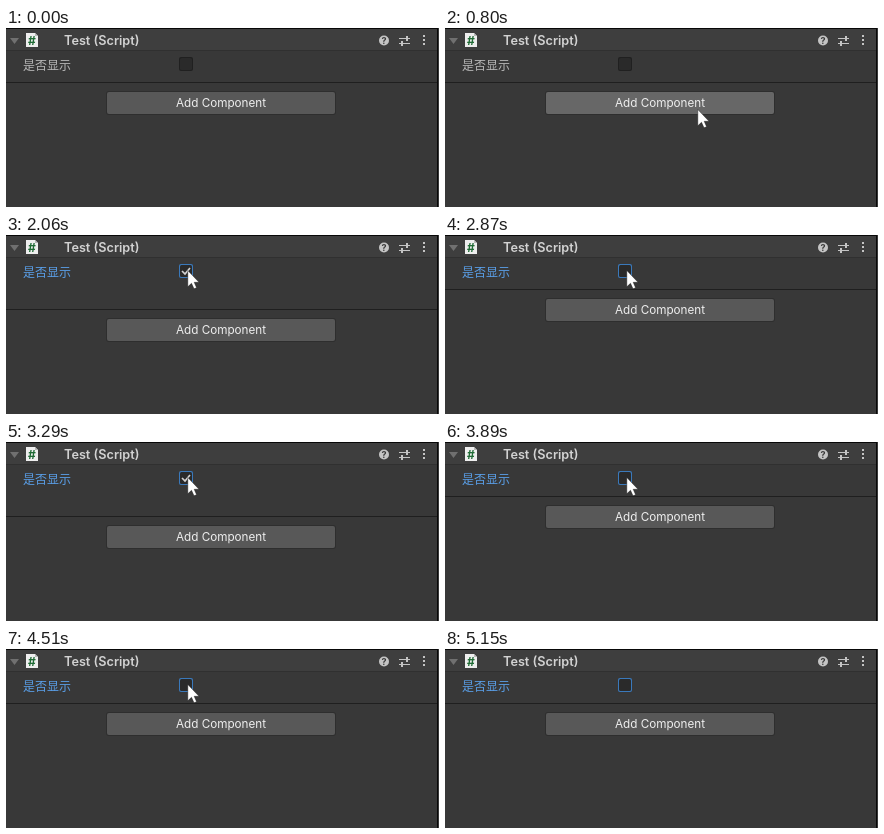
Recreate the animation shown at these times as an HTML page with a canvas. Size 433x179 px, loop 5.52 s.

```html
<!DOCTYPE html>
<html lang="zh-CN">
<head>
<meta charset="utf-8">
<title>Inspector toggle</title>
<style>
html, body { margin: 0; width: 100%; height: 100%; overflow: hidden; background: #383838; }
canvas { display: block; }
</style>
</head>
<body>
<canvas id="stage" width="433" height="179"></canvas>
<script>
const ctx = document.getElementById('stage').getContext('2d');
const LOOP = 5520;
const ROW = 20;
const PRESSES = [[1580, 1710], [2640, 2870], [3190, 3290], [3740, 3890], [4060, 4180], [4350, 4510]];

const lerp = (a, b, u) => a + (b - a) * u;
const easeOut = (u, power) => 1 - Math.pow(1 - u, power);
const smooth = u => u * u * (3 - 2 * u);

function cursorAt(t) {
  if (t < 580 || t >= 5150) return null;
  if (t < 1130) {
    const u = (t - 580) / 550;
    return [lerp(362, 171, easeOut(u, 1.66)), lerp(171, 29, easeOut(u, 1.95))];
  }
  if (t < 1260) return [171, 29];
  if (t < 1420) {
    const u = smooth((t - 1260) / 160);
    return [lerp(171, 180, u), lerp(29, 33, u)];
  }
  if (t < 1580) return [180, 33];
  if (t < 2030) return [181, 33];
  if (t < 2060) return [181, 34];
  if (t < 4740) return [181, 35];
  const u = Math.pow((t - 4740) / 410, 1.5);
  return [lerp(181, 353, u), lerp(35, 178, u)];
}

function rect(x, y, w, h, color) {
  ctx.fillStyle = color;
  ctx.fillRect(x, y, w, h);
}

function roundRect(x, y, w, h, r, color) {
  ctx.fillStyle = color;
  ctx.beginPath();
  ctx.roundRect(x, y, w, h, r);
  ctx.fill();
}

function disc(x, y, r, color) {
  ctx.fillStyle = color;
  ctx.beginPath();
  ctx.arc(x, y, r, 0, Math.PI * 2);
  ctx.fill();
}

function shape(points, color) {
  ctx.fillStyle = color;
  ctx.beginPath();
  points.forEach(([x, y]) => ctx.lineTo(x, y));
  ctx.closePath();
  ctx.fill();
}

function text(str, x, y, font, color, align = 'left') {
  ctx.font = font;
  ctx.fillStyle = color;
  ctx.textAlign = align;
  ctx.fillText(str, x, y);
}

function drawHeader() {
  rect(0, 0, 431, 23, '#3e3e3e');
  rect(0, 0, 431, 1, '#080808');
  rect(0, 22, 431, 1, '#303030');
  shape([[4, 10], [13, 10], [8.5, 16]], '#707070');

  shape([[20, 5], [29, 5], [32, 8], [32, 19], [20, 19]], '#eeeeee');
  shape([[29, 5], [32, 8], [29, 8]], '#b8b8b8');
  text('#', 26, 17, 'bold 12px Inter, sans-serif', '#1f6b35', 'center');
  text('Test (Script)', 58, 17, '600 12.7px Inter, sans-serif', '#d2d2d2');

  disc(378, 12.5, 5, '#c4c4c4');
  text('?', 378, 16, 'bold 9px Inter, sans-serif', '#383838', 'center');

  rect(393, 10, 11, 1, '#c4c4c4');
  rect(400, 8, 2, 5, '#c4c4c4');
  rect(393, 15, 11, 1, '#c4c4c4');
  rect(395, 13, 2, 5, '#c4c4c4');
  for (const y of [8, 12, 16]) rect(417, y - 1, 2, 2, '#c4c4c4');
}

function drawToggle(focused, checked) {
  text('是否显示', 17, 42, '12px "Noto Sans CJK SC", "Noto Sans CJK", sans-serif',
    focused ? '#5a9fe8' : '#b8b8b8');
  roundRect(173, 29, 14, 14, 2, focused ? '#3a79bb' : '#202020');
  roundRect(174, 30, 12, 12, 1.5, '#2a2a2a');
  if (!checked) return;
  ctx.strokeStyle = '#d2d2d2';
  ctx.lineWidth = 1.7;
  ctx.beginPath();
  ctx.moveTo(176, 36);
  ctx.lineTo(179, 39);
  ctx.lineTo(184, 33);
  ctx.stroke();
}

function drawButton(y, hovered) {
  roundRect(100, y, 230, 24, 3, '#2e2e2e');
  roundRect(101, y + 1, 228, 22, 2, hovered ? '#676767' : '#585858');
  text('Add Component', 215, y + 16, '11.7px Inter, sans-serif', '#eeeeee', 'center');
}

function drawCursor(x, y) {
  ctx.save();
  ctx.translate(Math.round(x), Math.round(y));
  ctx.lineJoin = 'round';
  shape([[0.8, 0.5], [0.8, 16.8], [4.5, 13.3], [7, 18.8], [9.6, 17.7], [7.2, 12.3], [12, 12.3]], '#ffffff');
  ctx.strokeStyle = 'rgba(20, 20, 20, 0.7)';
  ctx.lineWidth = 0.6;
  ctx.stroke();
  ctx.restore();
}

function draw(t) {
  const pressed = PRESSES.some(([down, up]) => t >= down && t < up);
  const checked = PRESSES.filter(([, up]) => t >= up).length % 2 === 1;
  const shift = checked ? ROW : 0;
  const cursor = cursorAt(t);
  const buttonY = 63 + shift;
  const hovered = cursor && cursor[0] >= 100 && cursor[0] < 330 &&
    cursor[1] >= buttonY && cursor[1] < buttonY + 24;

  rect(0, 0, 433, 179, '#383838');
  drawHeader();
  drawToggle(t >= 1580, checked);
  rect(0, 54 + shift, 431, 1, '#1f1f1f');
  drawButton(buttonY, hovered);
  rect(431, 0, 1, 179, '#080808');

  if (!cursor) return;
  if (pressed) disc(cursor[0], cursor[1], 12, 'rgba(196, 184, 20, 0.8)');
  drawCursor(...cursor);
}

function frame(now) {
  draw(now % LOOP);
  requestAnimationFrame(frame);
}
requestAnimationFrame(frame);
</script>
</body>
</html>
```
